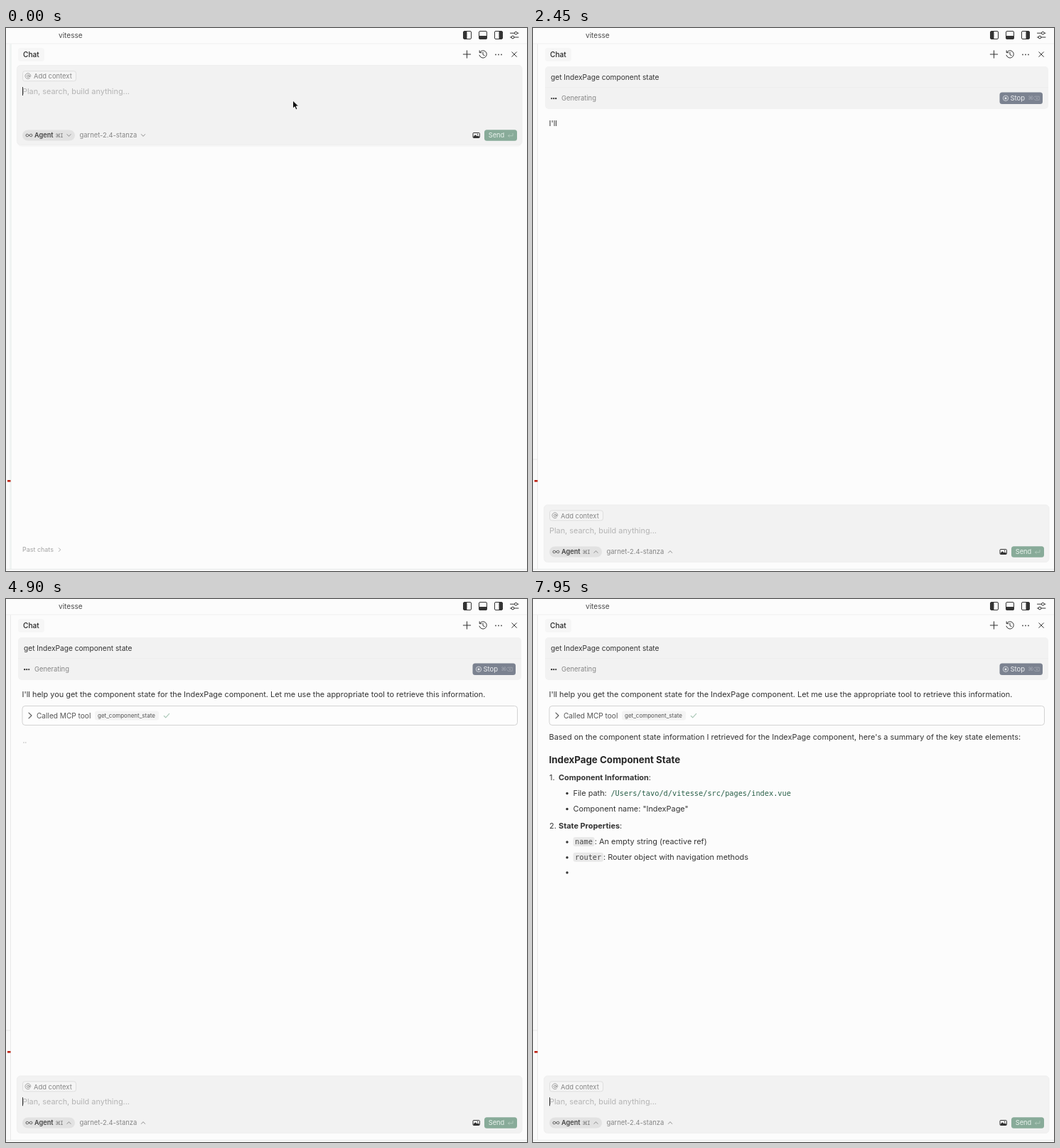
An HTML page that plays this animation: 733x764 px, repeating every 8 s.

```html
<!DOCTYPE html>
<html lang="en">
<head>
<meta charset="utf-8">
<title>Chat panel</title>
<style>
html, body { margin: 0; width: 100%; height: 100%; overflow: hidden; background: #fcfcfc; }
svg { display: block; width: 733px; height: 764px; }
text { font-family: Inter, "Open Sans", sans-serif; white-space: pre; }
.mono { font-family: "DejaVu Sans Mono", "Liberation Mono", monospace; }
.symbol { font-family: "DejaVu Sans", sans-serif; }
.line { fill: none; stroke-linecap: round; stroke-linejoin: round; }
</style>
</head>
<body>
<svg id="stage" viewBox="0 0 733 764" xmlns="http://www.w3.org/2000/svg"></svg>
<script>
const LOOP = 8000, PASTE = 300, SUBMIT = 650, TOOL = 3500, CALLED = 4400, SUMMARY = 5600;
const PROMPT = 'get IndexPage component state';
const INK = '#343434', GREY = '#858585', BODY = 10.92, CODE = 10.27;

const during = (from, to, body) => `<g data-from="${from}" data-to="${to}">${body}</g>`;
const after = (from, body) => during(from, LOOP, body);

// Text is placed by the middle of its capitals.
const label = (x, y, size, fill, body, weight = 400, cls = '') =>
  `<text class="${cls}" x="${x}" y="${(y + size * 0.364).toFixed(2)}" font-size="${size}" font-weight="${weight}" fill="${fill}">${body}</text>`;
const box = (x, y, w, h, r, fill, stroke = 'none') =>
  `<rect x="${x}" y="${y}" width="${w}" height="${h}" rx="${r}" fill="${fill}" stroke="${stroke}"/>`;
const line = (d, stroke, width = 1) =>
  `<path class="line" d="${d}" stroke="${stroke}" stroke-width="${width}"/>`;
const dot = (x, y, r, fill, cls = '') => `<circle class="${cls}" cx="${x}" cy="${y}" r="${r}" fill="${fill}"/>`;

// Words, or path segments, appear one after another; the tail is never bold.
function stream(x, y, str, start, step, { size = BODY, fill = INK, weight = 400, cls = '', tail = '' } = {}) {
  const parts = str.match(/\/?[^\s/]+\s*/g);
  const span = (part, i, attrs = '') =>
    `<tspan data-from="${start + i * step}" data-to="${LOOP}" ${attrs}>${part}</tspan>`;
  const spans = parts.map((part, i) => span(part, i)).join('');
  return label(x, y, size, fill, spans + span(tail, parts.length, 'font-weight="400"'), weight, cls);
}

const bullet = (y, at) => after(at, dot(48, y + 0.5, 1.7, INK));
const code = (x, y, w, str, at) =>
  after(at, box(x, y - 6.5, w, 13, 3, '#e9e9e9') + label(x + 2.6, y, CODE, '#444', str, 400, 'mono'));

function header() {
  const panel = (x, part) => box(x - 5.5, 4.5, 11, 11, 1.5, 'none', INK) + `<path d="${part}" fill="${INK}"/>`;
  return label(74, 10, 10.06, '#4a4a4a', 'vitesse')
    + panel(649, 'M643.5 5h5v10h-5z') + panel(671, 'M665.5 11h11v4.5h-11z') + panel(693, 'M693.5 5h5v10h-5z')
    + line('M709.5 7.2h6M719.3 7.2h1.7M709.5 13h1.7M715 13h6', INK)
    + `<g fill="none" stroke="${INK}"><circle cx="717.4" cy="7.2" r="1.9"/><circle cx="713" cy="13" r="1.9"/></g>`
    + box(17, 28, 37, 19, 4, '#f6f6f6') + label(24, 37.3, 10.1, '#222', 'Chat', 500)
    + line('M643.3 37h10.4M648.5 31.8v10.4', INK)
    + line('M666.6 34.2A5.2 5.2 0 1 1 666 38.2M666.2 31.8v2.9h2.9M671 34.3v3.2l2.3 1.3', INK)
    + [689, 693, 697].map(x => dot(x, 37.4, 0.85, INK)).join('')
    + line('M711.8 33.8l6.6 6.6M718.4 33.8l-6.6 6.6', INK);
}

function frameLines() {
  return box(0, 0, 733, 764, 0, '#fcfcfc')
    + box(0, 22, 6, 739, 0, '#fafafa') + box(6, 22, 1, 739, 0, '#e9e9e9')
    + box(0, 21.5, 733, 1, 0, '#f1f1f1') + box(0, 761, 733, 1, 0, '#e7e9e8')
    + during(0, SUBMIT, box(5, 22, 3, 739, 0, '#f0f3f2'))
    + after(SUBMIT, box(0, 606.5, 6, 1, 0, '#e9e9e9'))
    + box(2, 636, 4.5, 2.6, 0, '#bf2415');
}

function composer(top, height, input, foot, chevron, content) {
  const tip = foot + chevron * 1.4, wing = foot - chevron * 1.4;
  const arrow = x => line(`M${x - 2.6} ${wing}L${x} ${tip}L${x + 2.6} ${wing}`, '#858585', 0.9);
  const ctx = input - 21.3;
  return box(15.5, top, 710.5, height, 5, '#f2f2f2', '#efefef')
    + box(23.5, ctx - 7, 75, 14, 3, '#f5f5f5', '#dedede')
    + `<g class="line" stroke="#8c8c8c" stroke-width=".8"><circle cx="31" cy="${ctx}" r="1.6"/><path d="M32.7 ${ctx - 1.5}v2.2q1.9 1.2 2.1-1a3.9 3.9 0 1 0-1.5 3.3"/></g>`
    + label(39, ctx + 0.2, 9.4, GREY, 'Add context')
    + content
    + box(23, foot - 7.5, 74, 15, 7.5, '#e2e2e2')
    + line(`M32.5 ${foot}c-1.5-2-4.4-2.6-4.4 0s2.9 2 4.4 0s4.3-2.6 4.3 0s-2.8 2-4.3 0z`, '#555', 1)
    + label(40, foot, 9.2, '#444', 'Agent', 600)
    + label(69.5, foot, 7.4, '#777', '⌘', 400, 'symbol') + label(76, foot, 7.8, '#777', 'I', 400, 'mono')
    + arrow(88.5)
    + label(103.5, foot, 9.38, GREY, 'garnet-2.4-stanza') + arrow(193)
    + box(657, foot - 3.5, 9.4, 7, 1, 'none', '#333')
    + `<path d="M657.5 ${foot + 3}v-1.3l2.9-2.4l2.2 2l1.2-1l2.2 1.7v1z" fill="#333"/>` + dot(663.6, foot - 1.4, 0.8, '#333')
    + box(673, foot - 7.8, 46, 15.6, 3.5, '#88ab99')
    + label(678.7, foot, 9.3, '#e9f2ed', 'Send')
    + line(`M713 ${foot - 2.5}v3.2h-6.5M708.3 ${foot - 1}l-1.8 1.7l1.8 1.7`, '#b7cfc1', 0.8);
}

const placeholder = y => label(23, y, 10.87, '#b4b4b4', 'Plan, search, build anything...');
const caret = y => `<rect class="caret" x="23" y="${y - 6}" width="1" height="12" fill="#333"/>`;

function startScreen() {
  const y = 89;
  const content = during(0, PASTE, placeholder(y) + caret(y))
    + during(PASTE, SUBMIT, label(23, y, BODY, INK, PROMPT) + box(189, y - 6, 1, 12, 0, '#333'));
  return box(16, 60, 709.5, 107, 6, '#f6f6f6') + composer(52.5, 112, y, 151, 1, content)
    + label(23, 734, 8.95, '#a3a3a3', 'Past chats')
    + line('M74.3 731.7l2.4 2.4l-2.4 2.4', '#a3a3a3', 0.9);
}

function message() {
  return box(17, 54, 708, 60, 5, '#f2f2f2') + box(17, 83, 708, 1, 0, '#eeeeee')
    + label(25, 69, 10.16, INK, PROMPT)
    + [26.2, 29.2, 32.2].map(x => dot(x, 99.2, 1.15, '#222', 'pulse')).join('')
    + label(40, 99, 9.4, GREY, 'Generating')
    + box(656.5, 90.6, 60.5, 16.4, 3.5, '#7b8290')
    + `<circle cx="665" cy="98.8" r="3.7" fill="none" stroke="#e4e6ea" stroke-width=".8"/>` + box(663.6, 97.4, 2.8, 2.8, 0.5, '#e4e6ea')
    + label(671.5, 98.8, 9.5, '#eceef0', 'Stop')
    + label(696.5, 98.8, 7.4, '#a6abb5', '⌘', 400, 'symbol')
    + line('M706.3 96.2h6v5.2h-6l-2.4-2.6zM707.6 97.6l2.5 2.5M710.1 97.6l-2.5 2.5', '#a6abb5', 0.7);
}

function toolCall() {
  const chip = x => box(x - 4, 157.5, 90, 13, 3, '#f4f4f4') + label(x, 164, 8, '#555', 'get_component_state');
  return box(23, 150.5, 696.5, 27, 4, '#fdfdfd', '#d3d3d3')
    + line('M32 160.2l4 3.8l-4 3.8', '#555', 1.1)
    + during(TOOL, CALLED, label(43, 164, 10.1, '#555', 'Calling MCP tool') + chip(131.5))
    + after(CALLED, label(43, 164, 10.1, '#555', 'Called MCP tool') + chip(129)
      + line('M222.3 164.5l2.4 2.4l5-5.6', '#a9c7b6', 1.1));
}

function reply() {
  const bold = { weight: 700, tail: ':' };
  return stream(22.5, 134, "I'll help you get the component state for the IndexPage component. Let me use the appropriate tool to retrieve this information.", 2440, 40)
    + after(TOOL, toolCall())
    + stream(22.5, 194.3, "Based on the component state information I retrieved for the IndexPage component, here's a summary of the key state elements:", SUMMARY, 40)
    + stream(22.5, 226, 'IndexPage Component State', 6550, 50, { size: 13.3, weight: 700, fill: '#262626' })
    + stream(23, 251, '1.', 6700, 0) + stream(36, 251, 'Component Information', 6720, 40, bold)
    + bullet(273, 6800) + stream(56.5, 273, 'File path:', 6800, 30)
    + during(6870, 7700, box(107, 266.5, 258, 13, 3, '#f0f0f0'))
    + stream(109.4, 273, '/Users/tavo/d/vitesse/src/pages/index.vue', 6870, 25, { size: CODE, fill: '#2a6049', cls: 'mono' })
    + bullet(295, 7150) + stream(56.5, 295, 'Component name: "IndexPage"', 7150, 50)
    + stream(23, 319.3, '2.', 7350, 0) + stream(36, 319.3, 'State Properties', 7380, 40, bold)
    + bullet(341.5, 7450) + code(56.5, 341.5, 30, 'name', 7480)
    + stream(86.8, 341.5, ': An empty string (reactive ref)', 7500, 35)
    + bullet(363.3, 7680) + code(56.5, 363.3, 42.5, 'router', 7700)
    + stream(99, 363.3, ': Router object with navigation methods', 7730, 35)
    + bullet(384.5, 7930);
}

const waiting = (from, to, y) => during(from, to,
  [25, 27.8, 30.6].map((x, i) => `<circle class="wait" data-order="${i}" data-start="${from}" cx="${x}" cy="${y}" r=".65" fill="#a8a8a8"/>`).join(''));

const pointer = `<path id="pointer" d="M0 0V11.2L2.6 8.8L4.4 13L6.5 12.1L4.7 8H8.2Z" fill="#111" stroke="#fff" stroke-width=".9" stroke-linejoin="round"/>`;

const stage = document.getElementById('stage');
stage.innerHTML = frameLines() + header()
  + during(0, SUBMIT, startScreen())
  + after(SUBMIT, message() + composer(671, 80.5, 707.2, 737, -1, placeholder(707.2) + caret(707.2)))
  + waiting(1400, 2440, 142) + waiting(4500, SUMMARY, 202)
  + after(2440, reply()) + pointer;

const all = selector => [...stage.querySelectorAll(selector)];
const timed = all('[data-from]').map(el => ({ el, from: +el.dataset.from, to: +el.dataset.to }));
const carets = all('.caret'), pulses = all('.pulse'), waits = all('.wait');
const arrow = document.getElementById('pointer');
const show = (el, on) => { el.style.display = on ? '' : 'none'; };

const POINTER_PATH = [[0, 102], [450, 102], [850, 15], [1400, -13], [1550, -24], [LOOP, -24]];
function pointerY(t) {
  const i = POINTER_PATH.findIndex(([at]) => at > t);
  const [t0, y0] = POINTER_PATH[i - 1], [t1, y1] = POINTER_PATH[i];
  const p = (t - t0) / (t1 - t0);
  return y0 + (y1 - y0) * p * p * (3 - 2 * p);
}

function draw(t) {
  timed.forEach(({ el, from, to }) => show(el, t >= from && t < to));
  carets.forEach(el => show(el, (t + 400) % 1000 < 500));
  pulses.forEach((el, i) => el.setAttribute('opacity', 0.9 + 0.1 * Math.cos(t / 160 - i)));
  waits.forEach(el => show(el, Math.floor((t - el.dataset.start) / 200) % 4 > el.dataset.order));
  arrow.setAttribute('transform', `translate(403.5 ${pointerY(t)})`);
}

function tick() {
  draw(performance.now() % LOOP);
  requestAnimationFrame(tick);
}
tick();
</script>
</body>
</html>
```
